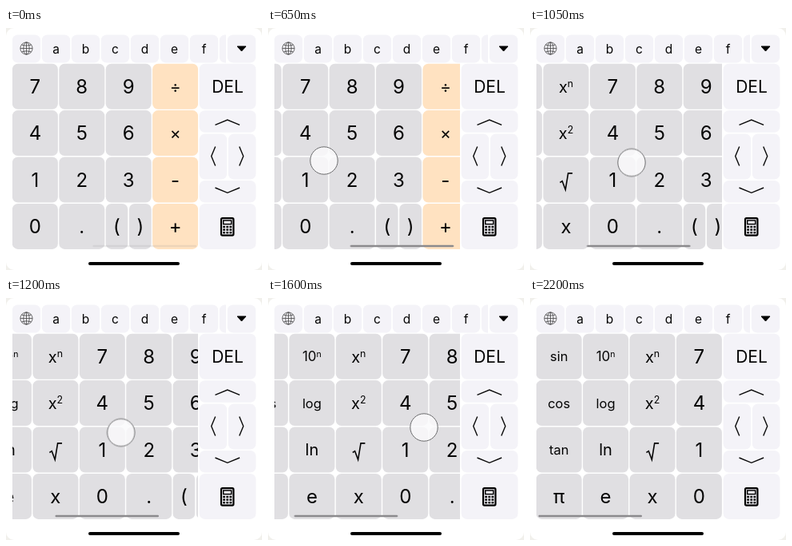
An HTML page for the animation above (2250 ms loop, 320x303 px).

```html
<!DOCTYPE html>
<html lang="en">
<head>
<meta charset="utf-8">
<title>Calculator keyboard</title>
<style>
@property --s { syntax: "<number>"; inherits: true; initial-value: 0; }
@property --x { syntax: "<number>"; inherits: true; initial-value: 53; }
@property --y { syntax: "<number>"; inherits: true; initial-value: 163; }

html, body { margin: 0; width: 100%; height: 100%; overflow: hidden; background: #f1f0ec; }
svg { display: block; }
#stage { animation: drag 2250ms infinite; }
text { font-family: Inter, "Liberation Sans", sans-serif; text-anchor: middle; fill: #050505; }
.line { fill: none; stroke: #0a0a0a; stroke-width: 1.4; }
.globe { fill: none; stroke: #444; stroke-width: .8; }
#strip { transform: translateX(calc((var(--s) - 175) * 1px)); }
#bar { transform: translateX(calc(var(--s) * -.56px)); animation: bar 2250ms step-end infinite; }
#touch { transform: translate(calc(var(--x) * 1px), calc(var(--y) * 1px)); animation: touch 2250ms step-end infinite; }

/* the motion advances every 50 ms */
@keyframes drag {
  0%     { --s: 0; --x: 53; --y: 163; animation-timing-function: step-end; }
  22.22% { --s: 0; --x: 53; --y: 163; animation-timing-function: steps(1); }
  24.44% { --s: 0; --x: 57; --y: 164; animation-timing-function: steps(2); }
  28.88% { --s: 10.3; --x: 70; --y: 166; animation-timing-function: steps(8); }
  46.66% { --s: 67; --x: 127; --y: 168.5; animation-timing-function: steps(7); }
  62.22% { --s: 106.5; --x: 166; --y: 168.5; animation-timing-function: steps(4); }
  71.11% { --s: 135.3; --x: 195; --y: 162; animation-timing-function: steps(5); }
  82.22% { --s: 175; --x: 235.8; --y: 153.8; animation-timing-function: step-end; }
  84.44%, 100% { --s: 175; --x: 238; --y: 153.5; }
}
@keyframes bar {
  0%     { opacity: .15; }
  24.44% { opacity: .55; }
  26.66%, 100% { opacity: 1; }
}
@keyframes touch {
  0%     { opacity: 0; }
  22.22% { opacity: 1; }
  86.66%, 100% { opacity: 0; }
}
</style>
</head>
<body>
<svg id="stage" width="320" height="303" viewBox="0 0 320 303">
  <clipPath id="view"><rect x="8" y="44" width="232" height="233"/></clipPath>
  <clipPath id="tabs"><rect x="8" y="8" width="267" height="36"/></clipPath>
  <rect width="320" height="303" rx="10" fill="#fff"/>
  <g id="top" clip-path="url(#tabs)"></g>
  <g id="side"></g>
  <g clip-path="url(#view)"><g id="strip"></g></g>

  <g class="globe">
    <circle cx="25.5" cy="25.5" r="7.6"/>
    <ellipse cx="25.5" cy="25.5" rx="3.7" ry="7.6"/>
    <path d="M25.5 18v15M18 25.5h15M19.4 21.2q6.1 2 12.2 0M19.4 29.8q6.1-2 12.2 0"/>
  </g>
  <path d="M289 23h11l-5.5 6z" stroke="#000" stroke-linejoin="round"/>
  <path class="line" d="M261.5 121.3l15.3-6.3 15.3 6.3M261.5 200l15.3 6.3 15.3-6.3M261.7 148.5l-5 12 5 12M291.7 148.5l5 12-5 12"/>
  <g id="calc">
    <rect x="269" y="238.2" width="15.4" height="21.4" rx="1.5" fill="none" stroke="#000" stroke-width="2.2"/>
    <rect x="271.7" y="241" width="10" height="4.6" fill="none" stroke="#000" stroke-width="1.5"/>
  </g>

  <rect id="bar" x="108.5" y="271.8" width="129.5" height="2.4" rx="1.2" fill="#8b8a8d"/>
  <rect x="103" y="293" width="114" height="4" rx="2"/>
  <circle id="touch" r="17.2" fill="#fbfbfc" fill-opacity=".82" stroke="#6b6b6d"/>
</svg>
<script>
const PITCH = 58.4, SIZE = 57;
const GREY = "#e0dfe2", LIGHT = "#f4f3f8", ORANGE = "#ffe2c1";
const $ = id => document.getElementById(id);

function add(parent, tag, attrs, content = "") {
  const el = document.createElementNS("http://www.w3.org/2000/svg", tag);
  for (const k in attrs) el.setAttribute(k, attrs[k]);
  el.textContent = content;
  parent.append(el);
  return el;
}

function key(parent, x, y, w, h, fill, label = "", size = 24) {
  add(parent, "rect", { x, y, width: w, height: h, rx: 7, fill });
  if (!label) return;
  const [base, sup] = label.split("^");
  const text = add(parent, "text", { x: x + w / 2, y: y + h / 2 + size * .365, "font-size": size }, base);
  if (sup) add(text, "tspan", { dy: -size * .34, "font-size": size * .62 }, sup);
}

// Scrolling columns, left to right
const columns = [
  ["sin", "cos", "tan", "π"],
  ["10^n", "log", "ln", "e"],
  ["x^n", "x^2", "√", "x"],
  ["7", "4", "1", "0"],
  ["8", "5", "2", "."],
  ["9", "6", "3", "()"],
  ["÷", "×", "-", "+"]
];
const sizes = { sin: 16.5, cos: 16.5, tan: 16.5, log: 16.5, "10^n": 17, ln: 20,
                "x^n": 20, "x^2": 20, "÷": 21, "×": 21 };
const strip = $("strip");

columns.forEach((labels, c) => labels.forEach((label, r) => {
  const x = 7.7 + c * PITCH, y = 44.7 + r * PITCH;
  const fill = c === 6 ? ORANGE : GREY;
  if (label === "()") {
    key(strip, x, y, 27.6, SIZE, fill, "(");
    key(strip, x + 29.2, y, 27.8, SIZE, fill, ")");
  } else if (label === "√") {
    key(strip, x, y, SIZE, SIZE, fill);
    add(strip, "path", {
      d: `M${x + 21} ${y + 32}l2.8-1.8 4 10.8 3.4-20.6h5.4`,
      fill: "none", stroke: "#050505", "stroke-width": 1.6
    });
  } else {
    key(strip, x, y, SIZE, SIZE, fill, label, sizes[label]);
  }
}));

["", ..."abcdef", ""].forEach((label, i) => key($("top"), 7.8 + i * 37, 8.5, 35.4, 35, LIGHT, label, 15.5));

const side = $("side");
key(side, 276.8, 8.5, 35.4, 35, LIGHT);
key(side, 241.6, 44.7, 70.8, SIZE, LIGHT, "DEL", 21);
key(side, 241.6, 103.2, 70.8, 27.6, LIGHT);
key(side, 241.6, 132.6, 34.6, SIZE, LIGHT);
key(side, 277.8, 132.6, 34.6, SIZE, LIGHT);
key(side, 241.6, 191, 70.8, 27.6, LIGHT);
key(side, 241.6, 219.9, 70.8, SIZE, LIGHT);

for (let i = 0; i < 9; i++)
  add($("calc"), "rect", { x: 271.2 + i % 3 * 4.1, y: 247.8 + (i / 3 | 0) * 3.6, width: 2.8, height: 2.4 });
</script>
</body>
</html>
```
